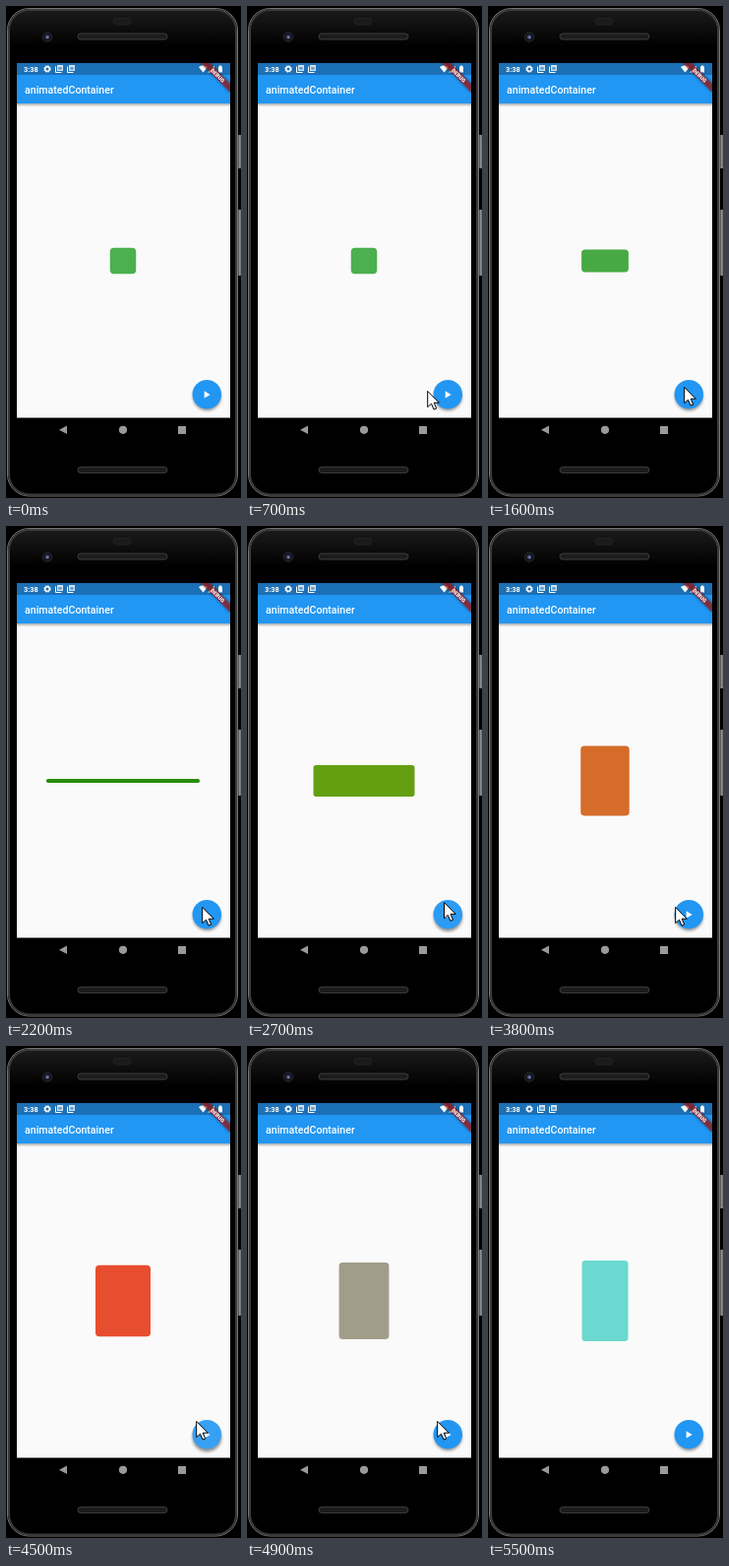
An HTML page that plays this animation: 239x500 px, repeating every 6000 ms.

```html
<!DOCTYPE html>
<html lang="en">
<head>
<meta charset="utf-8">
<title>animatedContainer</title>
<style>
html, body { margin: 0; width: 100%; height: 100%; overflow: hidden; background: #000; }
svg { display: block; width: 239px; height: 500px; }
text { font-family: Roboto, sans-serif; fill: #fff; }
</style>
</head>
<body>
<svg viewBox="0 0 239 500">
  <defs>
    <linearGradient id="shell" x2="0" y2="1">
      <stop offset="0" stop-color="#1c1c1c"/>
      <stop offset=".08" stop-color="#000"/>
      <stop offset="1" stop-color="#000"/>
    </linearGradient>
    <linearGradient id="key">
      <stop offset="0" stop-color="#444"/>
      <stop offset=".6" stop-color="#999"/>
      <stop offset="1" stop-color="#666"/>
    </linearGradient>
    <linearGradient id="shade" x2="0" y2="1">
      <stop offset="0" stop-opacity=".32"/>
      <stop offset="1" stop-opacity="0"/>
    </linearGradient>
    <filter id="blur" x="-50%" y="-50%" width="200%" height="200%"><feGaussianBlur stdDeviation="1.8"/></filter>
    <clipPath id="screen"><path d="M11 58h217v360.500H11z"/></clipPath>
    <g id="card">
      <path d="M2 0h6v6H2z" fill="#fff" fill-opacity=".8"/>
      <path d="M3.300 2h3.400v2.700H3.300z" fill="#1c70b5" fill-opacity=".6"/>
      <path d="M.5 1.500v6H6.500" fill="none" stroke="#fff"/>
    </g>
  </defs>

  <!-- phone -->
  <path d="M236 131h3v34h-3zM236 207h3v67h-3z" fill="url(#key)"/>
  <rect x="1.500" y="2.500" width="234" height="495.500" rx="22" fill="url(#shell)" stroke="#777"/>
  <rect x="3" y="4" width="231" height="492.500" rx="20.500" fill="none" stroke="#3a3a3a" stroke-width="2"/>
  <rect x="109" y="12.500" width="18" height="6.500" rx="3.200" fill="#1a1a1c" stroke="#2c2c2c" stroke-width=".6"/>
  <g fill="#1c1c1c" stroke="#484848" stroke-width=".8">
    <rect x="73" y="28" width="91" height="6" rx="3"/>
    <rect x="73" y="468.500" width="91" height="6" rx="3"/>
  </g>
  <circle cx="42" cy="31.500" r="4.800" fill="#15161c" stroke="#2c2d34" stroke-width=".8"/>
  <circle cx="42" cy="31.500" r="2" fill="#4a5290"/>
  <circle cx="42.300" cy="32" r=".8" fill="#aab"/>
  <path d="M11 58h217v385H11z"/>

  <g clip-path="url(#screen)">
    <path d="M11 58h217v361H11z" fill="#fafafa"/>
    <path d="M11 99h217v3.500H11z" fill="url(#shade)"/>
    <path d="M11 70h217v29H11z" fill="#2196f3"/>
    <path d="M11 58h217v12H11z" fill="#1c70b5"/>
    <text x="17.900" y="67" font-size="7.400" font-weight="700">3:38</text>
    <circle cx="42" cy="64" r="2.300" fill="none" stroke="#fff" stroke-width="1.500"/>
    <circle cx="42" cy="64" r="3.300" fill="none" stroke="#fff" stroke-width="1" stroke-dasharray="1.300 1.292"/>
    <use href="#card" x="50" y="60"/>
    <use href="#card" x="62" y="60"/>
    <path d="M196 62q4.500-3.500 9 0l-4.500 5.500zM212 60.500v7h-7zM216 61.500h1v-1h2v1h1v6h-4z" fill="#fff"/>
    <text x="19" y="89" font-size="10.600" font-weight="500">animatedContainer</text>
    <g transform="translate(228 58) rotate(45)">
      <path d="M-21 14.800h42v6.300h-42z" filter="url(#blur)" opacity=".5"/>
      <path d="M-21 14.800h42v6.300h-42z" fill="#b71c1c" fill-opacity=".63"/>
      <text y="19.900" font-size="5.400" font-weight="900" text-anchor="middle">DEBUG</text>
    </g>

    <rect id="box"/>
    <circle id="shadow" cx="204.400" filter="url(#blur)"/>
    <circle cx="204.300" cy="394.700" r="14.700" fill="#2196f3"/>
    <circle id="ripple" cx="204.300" cy="394.700" r="14.700" fill="#fff"/>
    <path d="M201.700 391.200v7.400l5.900-3.700z" fill="#fff"/>
  </g>

  <g fill="#9a9a9a">
    <path d="M62 426.500v8.500l-8-4.250z"/>
    <circle cx="119" cy="430.800" r="4.100"/>
    <path d="M175 427h8v8h-8z"/>
  </g>
  <path id="cursor" d="M0 0V16.200L3.800 12.800 6.400 18.700 9 17.600 6.500 11.800H11.700Z" fill="#fff" stroke="#000" stroke-linejoin="round"/>
</svg>
<script>
const LOOP = 6000, STEP = 100;
const $ = id => document.getElementById(id);
const mix = (a, b, p) => a.map((v, i) => v + (b[i] - v) * p);
const set = (el, attrs) => { for (const k in attrs) el.setAttribute(k, attrs[k]); };

// Each state: width, height, radius, r, g, b
const first = [26.5, 26.5, 4, 76, 175, 80];
const tweens = [
  { start: 1385, to: [159, 3.5, 2, 42, 139, 8] },
  { start: 2370, to: [34, 67, 3.5, 171, 183, 30] },
  { start: 3350, to: [56, 72.5, 4, 231, 77, 47] },
  { start: 4520, to: [47, 82, 3.5, 108, 217, 208] }
];
const presses = [2300, 3250, 4400];

// Cursor: time, x, y
const path = [
  [100, 79, 329], [250, 92, 385], [400, 130, 417], [550, 162, 405],
  [700, 183, 391], [900, 199, 387], [2300, 199, 387], [2800, 200, 381],
  [3100, 200, 381], [3600, 190, 387], [4000, 190, 387], [4200, 193, 381],
  [4900, 193, 381], [5100, 186, 365], [5400, 140, 290]
];

// cubic-bezier(.4, 0, .2, 1)
function ease(x) {
  if (x <= 0) return 0;
  if (x >= 1) return 1;
  let lo = 0, hi = 1, s;
  for (let i = 0; i < 24; i++) {
    s = (lo + hi) / 2;
    const q = 1 - s;
    if (1.2 * q * q * s + 0.6 * q * s * s + s ** 3 < x) lo = s; else hi = s;
  }
  return s * s * (3 - 2 * s);
}

function boxAt(t) {
  let state = first;
  if (t < 1600) return state;
  for (const { start, to } of tweens) state = mix(state, to, ease((t - start) / 1000));
  return state;
}

function cursorAt(t) {
  const i = path.findIndex(k => k[0] > t);
  if (i < 0) return path.at(-1);
  if (i === 0) return path[0];
  const a = path[i - 1], b = path[i];
  return mix(a, b, (t - a[0]) / (b[0] - a[0]));
}

function pressAt(t) {
  return Math.max(...presses.map(p => t > p && t < p + 450 ? Math.sin((t - p) / 450 * Math.PI) : 0));
}

function draw(now) {
  const t = Math.floor(now % LOOP / STEP) * STEP;
  const [w, h, rx, ...rgb] = boxAt(t);
  set($('box'), { x: 119 - w / 2, y: 259 - h / 2, width: w, height: h, rx, fill: `rgb(${rgb.map(Math.round)})` });
  const [, x, y] = cursorAt(t);
  set($('cursor'), { transform: `translate(${x + 0.7} ${y + 0.4})`, visibility: t >= 100 && t < 5500 ? 'visible' : 'hidden' });
  const p = pressAt(t);
  set($('ripple'), { opacity: p * 0.15 });
  set($('shadow'), { cy: 397 + p, r: 14.3 + p * 0.8, opacity: 0.42 });
  requestAnimationFrame(draw);
}
draw(0);
</script>
</body>
</html>
```
